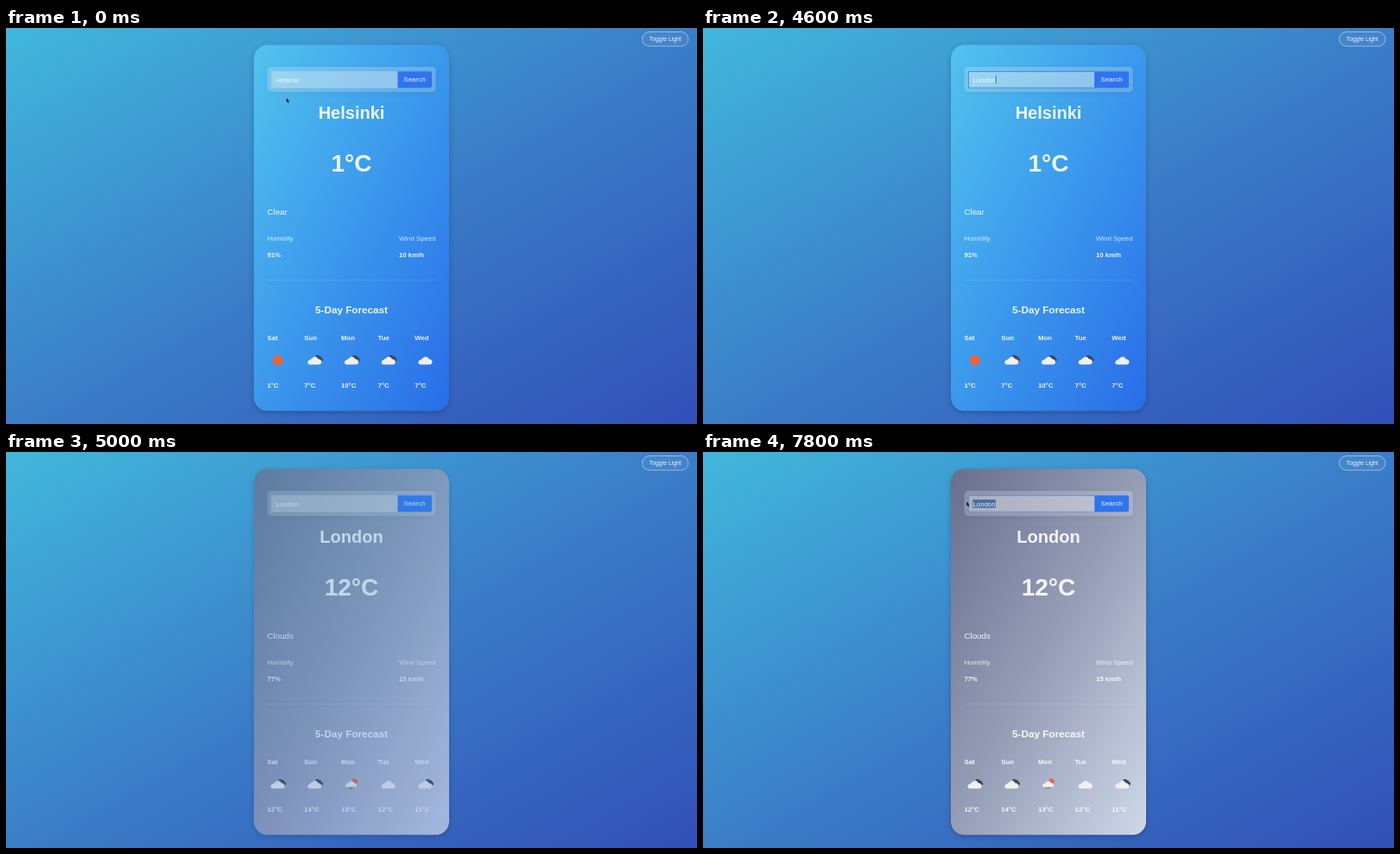
Animation of 800 by 458 pixels, one loop 8000 ms. Source, as an HTML page:

```html
<!DOCTYPE html>
<html lang="en">
<head>
<meta charset="utf-8">
<title>Weather</title>
<style>
  html, body { margin: 0; width: 100%; height: 100%; overflow: hidden; background: #3c7dc8; }
  svg { display: block; width: 100%; height: 100%; }
  text { font: 7.8px "Liberation Sans", Arial, sans-serif; fill: #fff; fill-opacity: .9; white-space: pre; }
  .soft { fill-opacity: .78; }
  .bold { font-weight: 700; }
  .mid { text-anchor: middle; }
  .shade { filter: drop-shadow(0 2px 3px rgba(0, 0, 0, .2)); }
</style>
</head>
<body>
<svg viewBox="0 0 800 458" preserveAspectRatio="none">
  <defs>
    <linearGradient id="sky" x2="1" y2="1">
      <stop stop-color="#41b7dc"/><stop offset=".5" stop-color="#3b7ec8"/><stop offset="1" stop-color="#314fb7"/>
    </linearGradient>
    <linearGradient id="clear" x2="1" y2="1">
      <stop stop-color="#52c3ee"/><stop offset=".5" stop-color="#3b98ec"/><stop offset="1" stop-color="#296de9"/>
    </linearGradient>
    <linearGradient id="clouds" x2="1" y2="1">
      <stop stop-color="#686f8e"/><stop offset=".5" stop-color="#969eb7"/><stop offset="1" stop-color="#cfd8e8"/>
    </linearGradient>
    <path id="cloud" d="M-5.6 5.1A2.7 2.7 0 0 1-5.4-.3A2.2 2.2 0 0 1-3.2-1.9A3.9 3.9 0 0 1 4-1.2A3.2 3.2 0 0 1 5.2 5.1Z" fill="#f0f0f2"/>
    <g id="broken">
      <g fill="#41454f"><circle cx="2.8" cy="-3.5" r="2.4"/><circle cx="5.1" cy="-2.5" r="2.5"/><circle cx="7.1" cy="-.7" r="2.3"/></g>
      <use href="#cloud"/>
    </g>
    <circle id="sun" r="6" fill="#e9633c"/>
    <g id="rain">
      <circle cx="3.3" cy="-3.2" r="3.3" fill="#e9633c"/>
      <use href="#cloud" transform="translate(-.5 -.5) scale(.8)"/>
      <path d="M-3 3.2l-1 1.6M0 3.2l-1.4 2.6M2.6 3.2l-1 1.6" stroke="#4b505c" stroke-width=".9"/>
    </g>
  </defs>

  <rect width="800" height="458" fill="url(#sky)"/>
  <rect x="736.5" y="4.5" width="53.5" height="16.5" rx="8.25" fill="#fff" fill-opacity=".05" stroke="#fff" stroke-opacity=".55" stroke-width=".8"/>
  <text class="mid" x="763.3" y="15.2" style="font-size:6.85px">Toggle Light</text>

  <g id="card">
    <rect id="panel" class="shade" x="287" y="19.6" width="226" height="423.2" rx="15.5"/>
    <rect class="shade" x="302.6" y="45" width="195" height="29" rx="4.5" fill="#fff" fill-opacity=".22"/>
    <rect id="field" x="307.5" y="50.5" width="146" height="18.6" fill="#fff" fill-opacity=".27" stroke-width=".8"/>
    <path d="M453.5 50.2H491a2 2 0 0 1 2 2V67.200a2 2 0 0 1-2 2H453.500Z" fill="#2f74ef"/>
    <text class="mid" x="473" y="62.200" style="font-size:8px">Search</text>
    <rect id="mark" y="55" height="9.600" fill="#386399" fill-opacity=".85"/>
    <text id="query" x="312.500" y="62.600"></text>
    <rect id="caret" y="55.200" width=".8" height="9" fill="#27588f"/>
    <path d="M302.500 291.600h195" stroke="#fff" stroke-opacity=".17" stroke-width=".7"/>
    <g id="info"></g>
  </g>

  <g id="cursor">
    <path id="arrow" d="M0 0v6l1.400-1.200 1 2.100 1-.5-1-2H4.200Z" fill="#15181f" stroke="#fff" stroke-opacity=".5" stroke-width=".35"/>
    <path id="beam" d="M-1.400-4Q0-4 0-3V3Q0 4 1.400 4M1.400-4Q0-4 0-3M0 3Q0 4-1.400 4" fill="none" stroke="#26415f" stroke-width=".7"/>
  </g>
</svg>
<script>
const $ = id => document.getElementById(id);
const set = (el, attrs) => { for (const k in attrs) el.setAttribute(k, attrs[k]); };
const show = (id, on) => { $(id).style.display = on ? '' : 'none'; };

const DAYS = ['Sat', 'Sun', 'Mon', 'Tue', 'Wed'];
const CITIES = {
  Helsinki: { temp: 1, sky: 'Clear', fill: 'clear', humidity: 91, wind: 10,
    temps: [1, 7, 10, 7, 7], icons: ['sun', 'broken', 'broken', 'broken', 'cloud'] },
  London: { temp: 12, sky: 'Clouds', fill: 'clouds', humidity: 77, wind: 15,
    temps: [12, 14, 13, 12, 11], icons: ['broken', 'broken', 'rain', 'cloud', 'broken'] }
};
const LOOP = 8000, STEP = 100, LEFT = 312.5;
const SWAP = 4700;

// time, x, y
const MOVES = [
  [0, 324.5, 80.5], [500, 338, 66], [900, 341, 60], [1400, 299, 60], [3100, 299, 60],
  [5800, 299.5, 60], [6400, 325, 61], [6900, 340, 60], [7200, 338, 60], [7800, 305, 57]
];
const TYPED = [[3100, 'L'], [3400, 'Lo'], [3600, 'Lon'], [3800, 'Lond'], [3900, 'Londo'], [4000, 'London']];

const label = (x, y, str, cls = '', size = 7.8) =>
  `<text x="${x}" y="${y}" class="${cls}" style="font-size:${size}px">${str}</text>`;

let city;
function setCity(name) {
  if (name === city) return;
  city = name;
  const c = CITIES[name];
  set($('panel'), { fill: `url(#${c.fill})` });
  $('info').innerHTML =
    label(400, 105, name, 'bold mid', 20) +
    label(400, 166.4, c.temp + '°C', 'bold mid', 28) +
    label(302.4, 215.6, c.sky, '', 9.8) +
    label(302.4, 245.6, 'Humidity', 'soft') +
    label(302.4, 265.2, c.humidity + '%', 'bold') +
    label(455, 245.6, 'Wind Speed', 'soft') +
    label(455, 265.2, c.wind + ' km/h', 'bold') +
    label(400, 330.3, '5-Day Forecast', 'bold mid', 11.7) +
    DAYS.map((day, i) => {
      const x = 302.5 + i * 42.7;
      return label(x, 361.2, day, 'bold') + label(x, 416.2, c.temps[i] + '°C', 'bold') +
        `<use href="#${c.icons[i]}" transform="translate(${x + 12.3} 384.2)"/>`;
    }).join('');
}

function cursorAt(t) {
  const i = MOVES.findLastIndex(m => m[0] <= t);
  const a = MOVES[i], b = MOVES[i + 1] || a;
  const p = b === a ? 0 : (t - a[0]) / (b[0] - a[0]);
  return [a[1] + (b[1] - a[1]) * p, a[2] + (b[2] - a[2]) * p];
}

const widthOf = n => n ? $('query').getSubStringLength(0, n) : 0;

function draw(time) {
  const t = Math.floor(time / STEP) * STEP;
  const swapped = t >= SWAP;
  setCity(swapped ? 'London' : 'Helsinki');

  const p = Math.min(1, Math.max(0, (t - SWAP + 50) / 650));
  set($('card'), { opacity: swapped ? 1 - (1 - p) ** 1.7 : 1 });

  const typing = t >= 3100 && !swapped;
  const typed = TYPED.findLast(k => k[0] <= t);
  const word = typed ? typed[1] : 'Helsinki';
  if ($('query').textContent !== word) $('query').textContent = word;

  const focus = t >= 900 && !swapped || t >= 6900;
  set($('field'), {
    stroke: focus ? (swapped ? '#4a90e8' : '#3a78c4') : '#fff',
    'stroke-opacity': focus ? .85 : .42,
    'stroke-dasharray': focus ? 'none' : '1 1'
  });

  const [x, y] = cursorAt(t);
  const dragging = t >= 1000 && t < 3100 || t >= 7200;
  let from = word.length;
  if (dragging) while (from && LEFT + widthOf(from) > x + 2) from--;
  const start = widthOf(from), end = widthOf(word.length);
  set($('mark'), { x: LEFT + start - .3, width: end - start + .6 });
  show('mark', dragging && end > start);
  set($('caret'), { x: LEFT + end + .3 });
  show('caret', typing);

  show('cursor', t < 3100 || t >= 5800);
  set($('cursor'), { transform: `translate(${x} ${y})` });
  const inField = x > 307 && x < 453 && y > 50 && y < 69 || t >= 1000 && t < 3100;
  show('arrow', !inField);
  show('beam', inField);
}

const began = performance.now();
function tick() {
  draw((performance.now() - began) % LOOP);
  requestAnimationFrame(tick);
}
tick();
</script>
</body>
</html>
```
